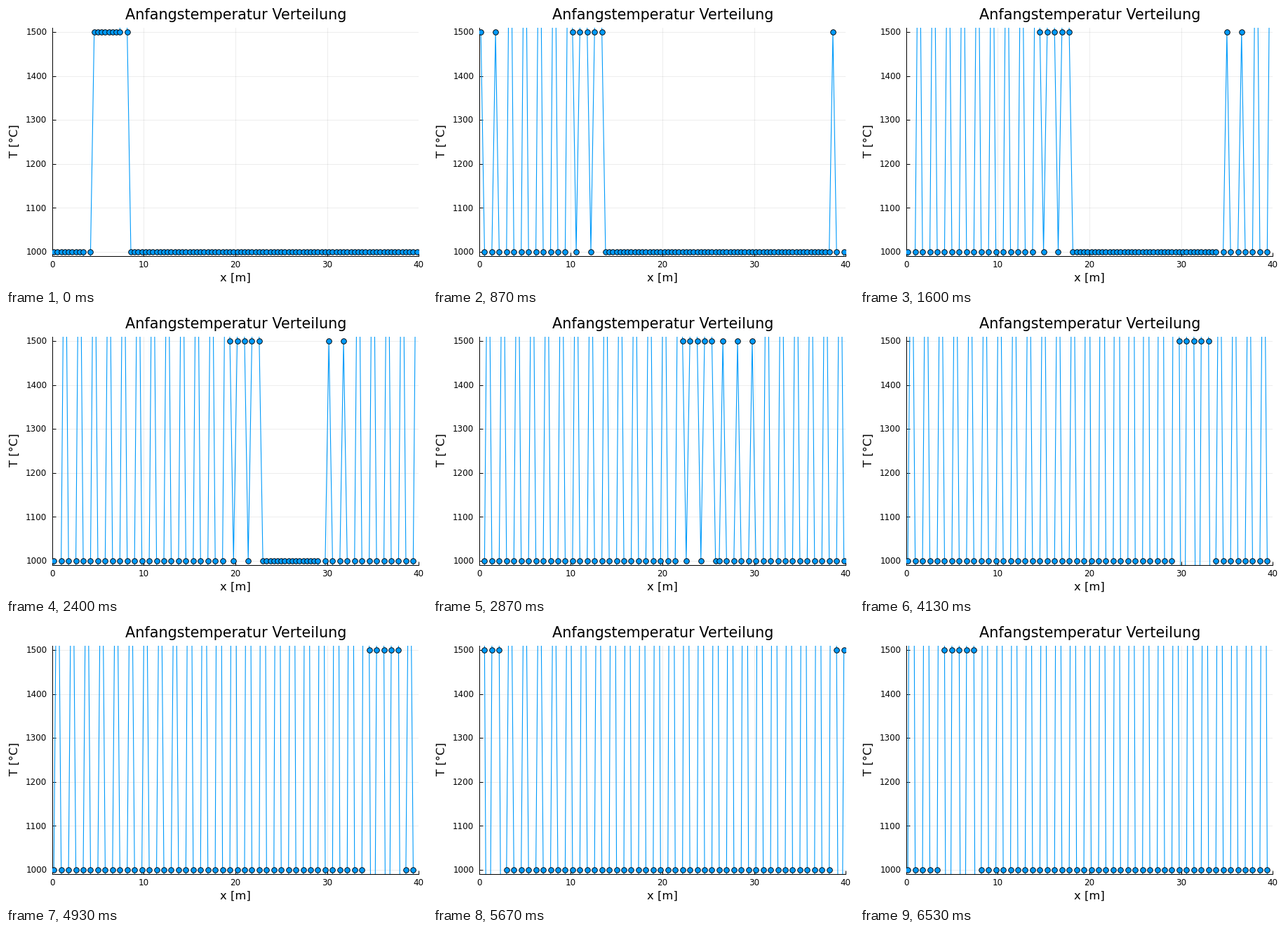
Write a matplotlib script that moves like this. It is 600 px wide and 400 px high and loops after 6590 ms.

```python
import numpy as np
import matplotlib.pyplot as plt
from matplotlib.animation import FuncAnimation

W, H = 600, 400
PX = 0.72                      # points per pixel at 100 dpi
FRAMES, LOOP = 99, 6590
CELLS, LENGTH = 100, 40
LEFT, RIGHT, TOP, BOTTOM = 65.6, 588.2, 30.8, 355.9

plt.rcParams["font.family"] = "DejaVu Sans"


def leapfrog(x, steps):
    """Periodic advection at Courant number 1, started with an Euler step."""
    old = np.where((x > 4) & (x < 8), 1500.0, 1000.0)
    slope = lambda u: np.roll(u, -1) - np.roll(u, 1)
    now = old - slope(old)
    states = [now]
    for _ in range(steps - 1):
        old, now = now, old - slope(now)
        states.append(now)
    return states


x = (np.arange(CELLS) + 0.5) * LENGTH / CELLS
states = leapfrog(x, FRAMES)

fig = plt.figure(figsize=(W / 100, H / 100), dpi=100, facecolor="white")
ax = fig.add_axes([LEFT / W, 1 - BOTTOM / H, (RIGHT - LEFT) / W, (BOTTOM - TOP) / H])
ax.set(xlim=(0, LENGTH), ylim=(990, 1510),
       xticks=range(0, 41, 10), yticks=range(1000, 1501, 100))
ax.set_axisbelow(True)
ax.grid(color="black", alpha=0.1, lw=0.7 * PX)
ax.tick_params(direction="in", length=5 * PX, width=PX,
               labelbottom=False, labelleft=False)
for side, spine in ax.spines.items():
    spine.set_visible(side in ("left", "bottom"))
    spine.set(linewidth=PX, zorder=1)


def label(px, py, text, size, ha="center", rotation=0):
    fig.text(px / W, 1 - py / H, text, fontsize=size * PX, ha=ha, va="baseline",
             rotation=rotation, rotation_mode="anchor")


for t in ax.get_xticks():
    label(LEFT + t / LENGTH * (RIGHT - LEFT), 371.5, f"{t:.0f}", 11.9)
for t in ax.get_yticks():
    y = BOTTOM - (t - 990) / 520 * (BOTTOM - TOP)
    label(58.3, y + 4.4, f"{t:.0f}", 11.9, ha="right")
label(327.3, 18.6, "Anfangstemperatur Verteilung", 20.8)
label(327.3, 392, "x [m]", 16.4)
label(16.5, 192.5, "T [°C]", 16.4, rotation=90)

curve, = ax.plot(x, states[0], color="#009AFA", lw=1.1 * PX, marker="o",
                 ms=7.6 * PX, mec="black", mew=0.9 * PX, zorder=3)


def update(i):
    curve.set_ydata(states[i])
    return curve,


anim = FuncAnimation(fig, update, frames=FRAMES, interval=LOOP / FRAMES,
                     repeat=True, repeat_delay=0)
plt.show()
```
